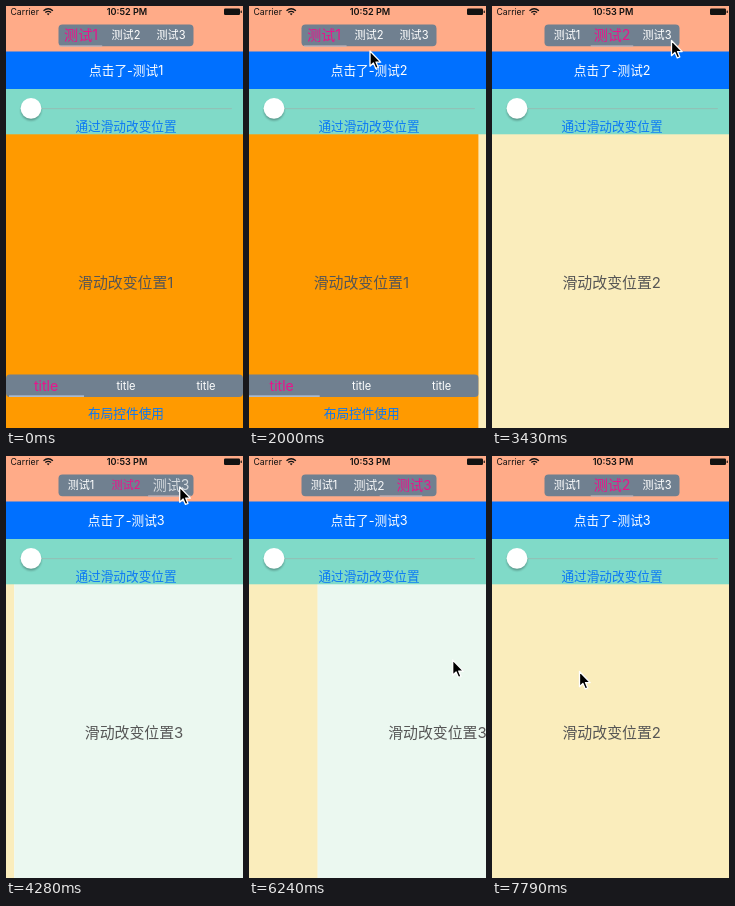
These frames come from a looping animation (237 by 422 pixels, 8000 ms). An HTML page:

```html
<!DOCTYPE html>
<html lang="zh-CN">
<head>
<meta charset="utf-8">
<title>Tabs</title>
<style>
  html, body { margin: 0; width: 100%; height: 100%; overflow: hidden; }
  svg { display: block; width: 100%; height: 100%; }
  text { font-family: Inter, "Noto Sans CJK SC", "Noto Sans CJK", sans-serif; text-anchor: middle; }
  .label { font-size: 14.9px; fill: #555; }
  .body { font-size: 12.65px; }
  .tab { font-size: 11.1px; }
  .link { fill: #0a78f5; }
  .status { font-size: 8.7px; fill: #111; }
</style>
</head>
<body>
<svg viewBox="0 0 237 422">
  <defs>
    <filter id="soft" x="-50%" y="-50%" width="200%" height="200%">
      <feGaussianBlur stdDeviation="1.3"/>
    </filter>
  </defs>

  <g id="pages">
    <g>
      <rect y="128" width="237" height="294" fill="#ff9a00"/>
      <text class="label" x="119.7" y="281.5">滑动改变位置1</text>
      <rect y="368.5" width="237" height="22.5" rx="4" fill="#708090"/>
      <rect x="3" y="389.3" width="75" height="1.7" fill="#a9b9cf"/>
      <g class="tab" fill="#fff">
        <text transform="translate(40 384.7) scale(1.27)" fill="#e8148c">title</text>
        <text x="120" y="384">title</text>
        <text x="200" y="384">title</text>
      </g>
      <text class="body link" x="120" y="412">布局控件使用</text>
    </g>
    <g>
      <rect y="128" width="237" height="294" fill="#faedbc"/>
      <text class="label" x="119.7" y="281.5">滑动改变位置2</text>
    </g>
    <g>
      <rect y="128" width="237" height="294" fill="#ebf8f0"/>
      <text class="label" x="119.7" y="281.5">滑动改变位置3</text>
    </g>
  </g>

  <rect width="237" height="46" fill="#ffab88"/>
  <rect y="83" width="237" height="45.3" fill="#80dac8"/>
  <rect y="45.5" width="237" height="37.5" fill="#0070ff"/>

  <text class="status" x="4.5" y="9" style="text-anchor:start">Carrier</text>
  <g fill="none" stroke="#111" stroke-width="1.3">
    <path d="M37.5 4.7Q42.2 .8 46.9 4.7M39.3 6.5Q42.2 4.1 45.1 6.5"/>
    <path d="M42.2 9.2L40.8 7.7Q42.2 6.6 43.6 7.7Z" fill="#111" stroke="none"/>
  </g>
  <text id="clock" class="status" x="121" y="9" font-weight="600" style="font-size:9.1px"></text>
  <rect x="218" y="2.4" width="16" height="6.6" rx="1.2" fill="#111"/>
  <rect x="234.6" y="4.5" width="1.2" height="2.4" rx=".5" fill="#111"/>

  <rect x="52.5" y="18.5" width="135" height="21.8" rx="4" fill="#708090"/>
  <rect id="line" y="39.4" width="42.5" height="1.4" fill="#c2b4b8"/>
  <g id="tabs" class="tab">
    <text>测试1</text>
    <text>测试2</text>
    <text>测试3</text>
  </g>

  <text id="title" class="body" x="120.2" y="69" fill="#fff"></text>

  <rect x="15" y="102" width="211" height="1.2" rx=".6" fill="#90c2b7"/>
  <circle cx="25" cy="104.3" r="10.2" fill="#000" opacity=".3" filter="url(#soft)"/>
  <circle cx="25" cy="102.3" r="10.4" fill="#fff"/>
  <text class="body link" x="120" y="125">通过滑动改变位置</text>

  <path id="cursor" d="M0 0V15.2L3.4 12L5.8 17.4L8.3 16.4L6 11.1H10.7Z"
        fill="#000" stroke="#fff" stroke-width="1.3" stroke-linejoin="round"/>
</svg>
<script>
const LOOP = 8000, WIDTH = 237;
const $ = id => document.getElementById(id);
const pages = [...$('pages').children], tabs = [...$('tabs').children];

const clamp = u => Math.max(0, Math.min(1, u));
const span = (t, a, b) => clamp((t - a) / (b - a));
const ease = u => u < .5 ? 2 * u * u : 1 - 2 * (1 - u) ** 2;

// Cursor stops: time, x, y
const stops = [
  [300, 205, 273], [700, 75, 140], [1100, 115, 51], [1150, 115, 51],
  [1300, 117.5, 38.5], [1430, 121, 45], [2700, 121, 45], [2930, 133, 40],
  [3130, 133, 40], [3430, 179.5, 34.5], [3660, 173.7, 31], [5070, 173.7, 31],
  [5900, 114.5, 210], [6090, 114, 210], [6240, 203.7, 204], [6500, 198, 207],
  [6960, 198, 207], [7060, 195, 207], [7160, 195, 207], [7790, 87.5, 215.5]
];

function cursorAt(t) {
  let i = 0;
  while (i < stops.length - 2 && t >= stops[i + 1][0]) i++;
  const [t0, x0, y0] = stops[i], [t1, x1, y1] = stops[i + 1];
  const u = ease(span(t, t0, t1));
  return [x0 + (x1 - x0) * u, y0 + (y1 - y0) * u];
}

// Swipe back: finger drag, then paging deceleration
function swipe(t) {
  if (t >= 6760) return 1;
  if (t < 6240) return .284 * span(t, 6110, 6240) ** 2;
  return 1 - .716 * Math.exp((6240 - t) / 120);
}

const pageAt = t => ease(span(t, 1960, 2290)) + ease(span(t, 3960, 4330)) - swipe(t);
const selectedAt = t => t < 2290 ? 0 : t < 4330 ? 1 : t < 6760 ? 2 : 1;

function render(t) {
  const page = pageAt(t), selected = selectedAt(t);
  pages.forEach((el, i) => el.setAttribute('transform', `translate(${(i - page) * WIDTH} 0)`));
  tabs.forEach((el, i) => {
    const near = clamp(1 - Math.abs(i - page)), s = 1 + .27 * near;
    el.setAttribute('transform', `translate(${75 + 45 * i} ${29.4 + 4 * s}) scale(${s})`);
    el.setAttribute('fill', i === selected ? '#e8148c' : '#fff');
    el.setAttribute('fill-opacity', i === selected ? 1 : 1 - .3 * near);
  });
  $('line').setAttribute('x', 53.7 + 45 * page);
  $('title').textContent = '点击了-测试' + (t < 2000 ? 1 : t < 3990 ? 2 : 3);
  $('clock').textContent = t < 2490 ? '10:52 PM' : '10:53 PM';
  $('cursor').setAttribute('transform', `translate(${cursorAt(t)})`);
  $('cursor').setAttribute('visibility', t < 300 ? 'hidden' : 'visible');
}

const start = performance.now();
function tick() {
  render((performance.now() - start) % LOOP);
  requestAnimationFrame(tick);
}
tick();
</script>
</body>
</html>
```
